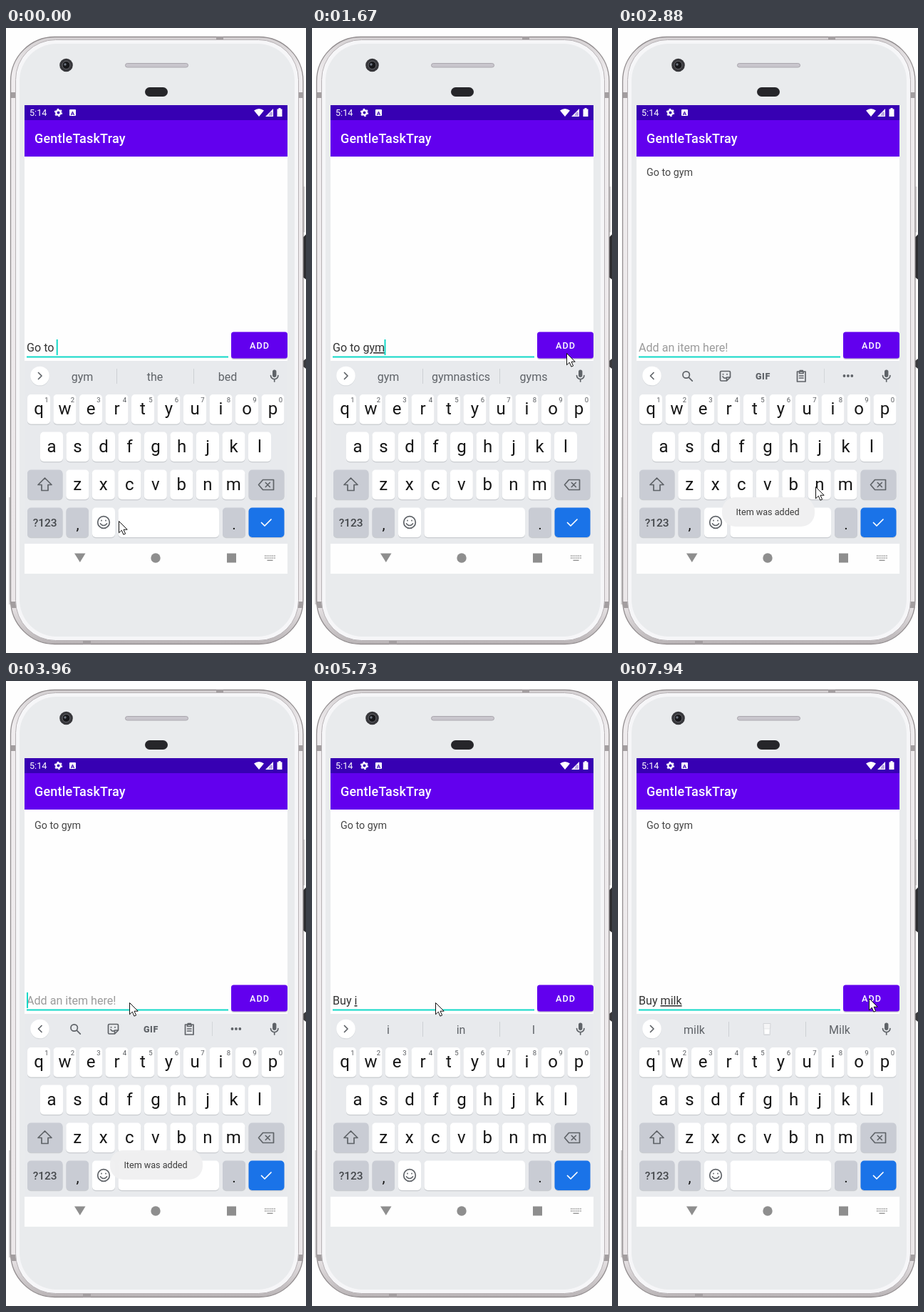
These frames come from a looping animation (421 px wide and 875 px high, 8000 ms). An HTML page:

```html
<!DOCTYPE html>
<html lang="en">
<head>
<meta charset="utf-8">
<title>To-do list demo</title>
<style>
html, body { margin: 0; width: 100%; height: 100%; overflow: hidden; background: #fefefe; }
svg { display: block; width: 421px; height: 875px; font-family: Roboto, "Open Sans", sans-serif; }
text { white-space: pre; }
.mid { text-anchor: middle; }
.field { font-size: 16.1px; }
.u { text-decoration: underline; text-decoration-skip-ink: none; }
.line { fill: none; stroke: #5f6368; stroke-width: 1.7; stroke-linecap: round; stroke-linejoin: round; }
#mouse, #toast, #glow { animation: 8s linear infinite; }
#mouse { animation-name: move; }
#toast { animation-name: toast; }
#glow { animation-name: glow; }
@keyframes move {
  0% { transform: translate(158px, 690px); }
  12.625% { transform: translate(158px, 690px); animation-timing-function: steps(5, start); }
  16.375% { transform: translate(272px, 556px); animation-timing-function: steps(4, start); }
  19.375% { transform: translate(375px, 468px); animation-timing-function: steps(2, start); }
  20.875% { transform: translate(357px, 455px); }
  23.5% { transform: translate(357px, 455px); animation-timing-function: steps(5, start); }
  27.25% { transform: translate(378px, 568px); animation-timing-function: steps(3, start); }
  29.5% { transform: translate(394px, 640px); animation-timing-function: steps(3, start); }
  31.5% { transform: translate(350px, 702px); animation-timing-function: steps(3, start); }
  33.5% { transform: translate(290px, 653px); animation-timing-function: steps(3, start); }
  36% { transform: translate(277px, 642px); }
  36.7% { transform: translate(277px, 642px); animation-timing-function: steps(5, start); }
  39.5% { transform: translate(173px, 450px); }
  94.875% { transform: translate(173px, 450px); animation-timing-function: steps(4, start); }
  97.25% { transform: translate(278px, 464px); animation-timing-function: steps(3, start); }
  99.25%, 100% { transform: translate(352px, 444px); }
}
@keyframes toast {
  0%, 25% { opacity: 0; }
  27.25% { opacity: .5; }
  30%, 49.5% { opacity: 1; }
  55.375%, 100% { opacity: 0; }
}
@keyframes glow {
  0%, 23.4% { opacity: 0; }
  24.5%, 28% { opacity: .19; }
  31.5%, 100% { opacity: 0; }
}
</style>
</head>
<body>
<svg viewBox="0 0 421 875">
  <defs>
    <linearGradient id="rim" x2="0" y2="1">
      <stop offset="0" stop-color="#d4d0d2"/><stop offset=".06" stop-color="#efecee"/>
      <stop offset=".93" stop-color="#ebe7e9"/><stop offset="1" stop-color="#b9b4b6"/>
    </linearGradient>
  </defs>

  <!-- phone body -->
  <path d="M417 222h2.5v64H417z" fill="#d9d6d8"/>
  <path d="M421 289l-4 4v56l4 3z" fill="#2d2d30"/>
  <path d="M421 463l-4 3v8l4 3z" fill="#3a3a3d"/>
  <path d="M5 657v150" stroke="#aaa5a7"/>
  <rect x="6.5" y="12.5" width="410.500" height="850" rx="62" fill="url(#rim)" stroke="#928d8f" stroke-width="1.3"/>
  <path d="M7 90h7v8H7zM410 90h7v8h-7zM7 803h7v9H7zM410 803h7v9h-7zM295 12h10v5h-10zM108 858h11v5h-11z" fill="#a39ea0"/>
  <rect x="13.500" y="16.500" width="397" height="841" rx="56" fill="#f6f6f8" stroke="#b7b2b5"/>
  <rect x="19" y="22" width="386" height="830" rx="52" fill="#e9ebed"/>
  <circle cx="84.500" cy="52" r="9.300" fill="#37373b"/>
  <circle cx="84.500" cy="52" r="5.500" fill="#17171a" stroke="#68686e"/>
  <circle cx="83" cy="51" r="1.700" fill="#6d7480"/>
  <rect x="167.500" y="49.500" width="88" height="5.500" rx="2.750" fill="#c9c6cd" stroke="#aaa7ae"/>
  <rect x="195" y="83" width="32" height="13" rx="6.500" fill="#26262a"/>

  <!-- screen -->
  <rect x="26" y="108" width="369" height="656" fill="#fefefe"/>
  <rect x="26" y="129" width="369" height="51" fill="#6200ee"/>
  <rect x="26" y="108" width="369" height="21" fill="#3700b3"/>
  <g fill="#fff">
    <text x="33" y="122.700" font-size="12.600">5:14</text>
    <circle cx="73.500" cy="118.500" r="3.200" fill="none" stroke="#fff" stroke-width="2.400"/>
    <circle cx="73.500" cy="118.500" r="4.900" fill="none" stroke="#fff" stroke-width="1.500" stroke-dasharray="2.570"/>
    <rect x="89" y="114" width="9" height="9" rx="1"/>
    <text x="93.500" y="121.500" font-size="8" font-weight="700" class="mid" fill="#3700b3">A</text>
    <path d="M348 115.500q7-5 14 0l-7 8.500zM364 124l11-11v11zM380.500 113.500h2v-1.500h3v1.500h2V124h-7z"/>
    <path d="M371 117.500h3v5.500h-6z" fill="#3700b3" opacity=".35"/>
    <text x="40" y="161" font-size="18" font-weight="500" letter-spacing=".2">GentleTaskTray</text>
  </g>
  <text id="item" x="40" y="206.500" font-size="14.300" fill="#454545">Go to gym</text>

  <text id="hint" class="field" x="29" y="453" fill="#9b9b9b">Add an item here!</text>
  <text id="entry" class="field" x="29" y="453" fill="#333"><tspan></tspan><tspan class="u"></tspan><tspan></tspan></text>
  <rect x="29" y="459.500" width="283" height="2" fill="#12d9c8"/>
  <rect id="caret" y="436" width="2" height="22" fill="#12d9c8"/>
  <rect x="316" y="427" width="79" height="37" rx="3.500" fill="#cfcbd6"/>
  <rect x="316" y="425.500" width="79" height="37" rx="3.500" fill="#6200ee"/>
  <rect id="glow" x="316" y="425.500" width="79" height="37" rx="3.500" fill="#fff"/>
  <text x="356" y="448.500" class="mid" font-size="12.600" font-weight="500" letter-spacing="1.050" fill="#fff">ADD</text>

  <!-- keyboard -->
  <rect x="26" y="466" width="369" height="256" fill="#e8eaed"/>
  <circle cx="47.500" cy="488" r="13.300" fill="#d5d8dc"/>
  <circle cx="47.500" cy="487" r="13.300" fill="#fff"/>
  <path id="chev" class="line" d="M45.500 482.500l4.500 4.500-4.500 4.500"/>
  <g fill="#5f6368">
    <rect x="374" y="478.500" width="5.400" height="10.500" rx="2.700"/>
    <path class="line" d="M371.500 486.500a5.200 5.200 0 0 0 10.400 0M376.700 492v3" stroke-width="1.500"/>
  </g>
  <g id="words" class="mid" font-size="16" fill="#5f6368">
    <path d="M155.500 477v21M263.500 477v21" stroke="#cdd0d4"/>
    <text x="107" y="493.500"></text>
    <text x="209" y="493.500"></text>
    <text x="311" y="493.500"></text>
    <g id="glass">
      <path d="M204 479.500h10l-.8 16h-8.400z" fill="#f5f5f6" stroke="#d2d4d8"/>
      <path d="M204.800 487h8.400l-.5 7.500h-7.400z" fill="#fff" stroke="#dcdee1" stroke-width=".7"/>
    </g>
  </g>
  <g id="tools">
    <g class="line">
      <circle cx="95.700" cy="485.500" r="4.700"/><path d="M99.300 489.200l5 5"/>
      <path d="M145 480.500h11q1.500 0 1.500 1.500v7l-5 5h-7.500q-1.500 0-1.500-1.500v-10.500q0-1.500 1.500-1.500zM157 489h-4.500v4.500M147 488q2 3 4 2"/>
      <path d="M147.500 484.500v.5M153 484.500v.5"/>
      <path d="M251.500 481h11.500v14h-11.500zM254.500 481v2.500h5.500V481M254.500 487h5.500M254.500 490h5.500"/>
      <path d="M255.500 480h3.500" stroke-width="2.500"/>
    </g>
    <text x="203.500" y="491.500" class="mid" font-size="12.500" font-weight="900" letter-spacing=".7" fill="#5f6368">GIF</text>
    <path d="M289.500 477v20" stroke="#d3d6da"/>
    <path d="M317.500 487h11" stroke="#5f6368" stroke-width="3.800" stroke-linecap="round" stroke-dasharray="0 5.400"/>
  </g>
  <g id="keys"></g>
  <g class="line" stroke="#4a4d51">
    <path d="M54.500 630l9.500 9.500h-5v8h-9v-8h-5z"/>
    <path d="M360.500 632.500h15v14h-15l-6-7zM364.300 636.500l6 6M370.300 636.500l-6 6"/>
    <circle cx="137" cy="692" r="8.300"/><path d="M132.500 694q4.500 5 9 0M134 689.300v.4M140 689.300v.4"/>
    <path d="M358.500 692.500l4.500 4.500 9-9" stroke="#fff"/>
  </g>

  <!-- navigation bar -->
  <rect x="26" y="722" width="369" height="42" fill="#fefefe"/>
  <g fill="#8e8e8e">
    <path d="M96 735.500h15.500l-7.700 12.500z"/><circle cx="210" cy="742" r="6.700"/><path d="M310 735.500h13v13h-13z"/>
    <path d="M363 739h15M363 742h15" stroke="#8e8e8e" stroke-width="1.500" stroke-dasharray="1.500 1.150"/>
    <path d="M366.500 745.300h8" stroke="#8e8e8e" stroke-width="1.300"/>
  </g>

  <g id="toast">
    <rect x="146" y="657" width="130" height="41" rx="19" fill="#f0f0f1"/>
    <text x="210" y="682" class="mid" font-size="12.600" fill="#3c3c3c">Item was added</text>
  </g>
  <path id="mouse" d="M.5.5v16.300l3.800-3.600 2.600 6 2.700-1.200-2.600-5.800h5.200z" fill="#fff" stroke="#111"/>
</svg>
<script>
const $ = id => document.getElementById(id);
const show = (el, on) => { el.style.display = on ? '' : 'none'; };

// Keyboard
const letter = (s, x, y, size = 24, fill = '#161616', weight = 400) =>
  `<text class="mid" x="${x}" y="${y}" font-size="${size}" fill="${fill}" font-weight="${weight}">${s}</text>`;
const key = (x, y, w, fill = '#fff') =>
  `<rect x="${x}" y="${y + 1.2}" width="${w}" height="41.5" rx="5" fill="#c9ccd0"/>` +
  `<rect x="${x}" y="${y}" width="${w}" height="41.5" rx="5" fill="${fill}"/>`;
const grey = '#c9ccd4';
let keys = '';
[['qwertyuiop', 46, 513], ['asdfghjkl', 64, 565.5], ['zxcvbnm', 100.3, 618.5]].forEach(([row, x0, y], r) => {
  [...row].forEach((c, i) => {
    const x = x0 + i * 36.5;
    keys += key(x - 16, y, 32) + letter(c, x, y + 28.3);
    if (!r) keys += letter((i + 1) % 10, x + 11, y + 10.5, 9.5, '#55585c');
  });
});
keys += key(30, 618.5, 49.5, grey) + key(340.5, 618.5, 50, grey) +
  key(30, 671.5, 49.5, grey) + key(84.5, 671.5, 31.5, grey) + key(121, 671.5, 32, '#fff') +
  key(157.5, 671.5, 141.5) + key(304, 671.5, 32, grey) + key(340.5, 671.5, 50, '#1a73e8') +
  letter('?123', 54.7, 698, 15.5, '#44474b', 500) + letter(',', 100.5, 702, 21) + letter('.', 320, 702, 21);
$('keys').innerHTML = keys;

// Time, text before the composing word, underlined part, new letters, suggestions (none: toolbar)
const steps = [
  [0, 'Go to ', '', '', 'gym the bed'],
  [160, 'Go to ', '', 'g', 'gym the bed'],
  [370, 'Go to ', 'g', '', 'g go get'],
  [400, 'Go to ', 'g', 'y', 'g go get'],
  [460, 'Go to ', 'gy', 'm', 'gym gy guy'],
  [640, 'Go to ', 'gym', '', 'gym gymnastics gyms'],
  [1880, '', '', '', 'gym gymnastics gyms'],
  [1940, '', '', '', ''],
  [4610, '', '', 'B', ''],
  [4700, '', 'B', 'u', 'B But Buy'],
  [4790, '', 'Buy', '', 'Bu Buy But'],
  [4880, '', 'Buy', '', 'Buy Buying Buyers'],
  [5030, 'Buy ', '', 'i', 'the it a'],
  [5240, 'Buy ', 'i', '', 'i in I'],
  [6130, 'Buy ', '', '', ''],
  [6190, 'Buy ', '', '', 'Milk milk a'],
  [6590, 'Buy ', '', 'm', 'Milk milk a'],
  [6740, 'Buy ', 'm', '', 'm milk man'],
  [6770, 'Buy ', 'm', 'i', 'm milk man'],
  [6950, 'Buy ', 'mi', 'l', 'mil milk Milk'],
  [7010, 'Buy ', 'mi', 'lk', 'mil milk Milk'],
  [7250, 'Buy ', 'milk', '', 'milk * Milk']
];
const caretOff = [[1010, 1520], [2370, 2940], [3430, 3960], [4430, 4610], [5730, 6130], [7590, 8000]];
const spans = $('entry').querySelectorAll('tspan');
const slots = $('words').querySelectorAll('text');
let start, last;

function setStep(step) {
  const [at, ...rest] = step;
  const words = rest.pop();
  rest.forEach((s, i) => { spans[i].textContent = s; });
  const text = rest.join('');
  show($('hint'), !text);
  show($('item'), at >= 1880);
  $('caret').setAttribute('x', text ? 28.3 + $('entry').getComputedTextLength() : 29);
  show($('words'), words);
  show($('tools'), !words);
  $('chev').setAttribute('d', words ? 'M45.500 482.500l4.500 4.500-4.500 4.500' : 'M50 482.500l-4.500 4.500 4.500 4.500');
  const list = words.split(' ');
  slots.forEach((el, i) => { el.textContent = list[i] === '*' ? '' : list[i] || ''; });
  show($('glass'), list[1] === '*');
}

function tick(now) {
  start ??= now;
  const t = (now - start) % 8000;
  const step = steps.findLast(s => s[0] <= t);
  if (step !== last) setStep(last = step);
  show($('caret'), !caretOff.some(([a, b]) => t >= a && t < b));
  requestAnimationFrame(tick);
}
requestAnimationFrame(tick);
</script>
</body>
</html>
```
